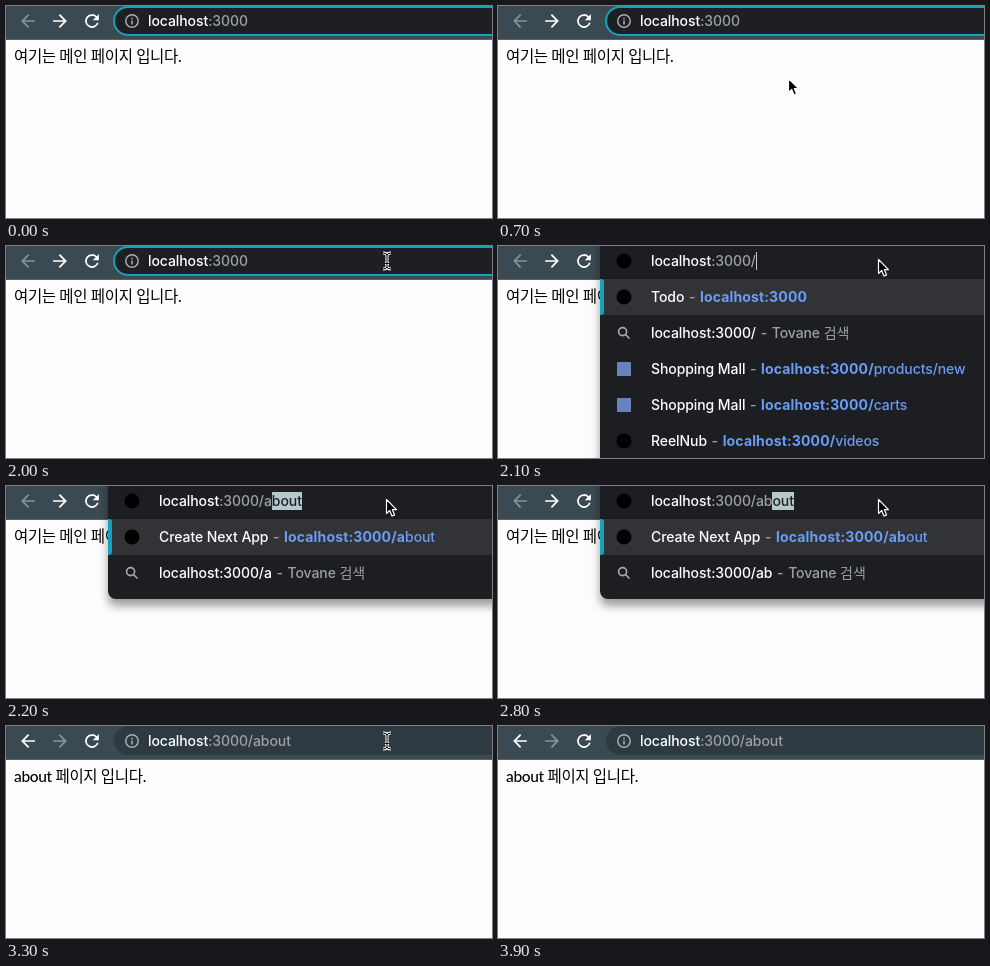
These frames come from a looping animation (486 by 212 pixels, 4900 ms). An HTML page:

```html
<!DOCTYPE html>
<html lang="ko">
<head>
<meta charset="utf-8">
<title>Page navigation</title>
<style>
  html, body { margin: 0; width: 100%; height: 100%; overflow: hidden; background: #fdfdfd; }
  #stage { position: relative; width: 486px; height: 212px; overflow: hidden; background: #fdfdfd; }
  #stage > * { position: absolute; box-sizing: border-box; }
  svg { left: 0; top: 0; }
  .toolbar { left: 0; top: 0; width: 486px; height: 34px; background: #3b4a52; border-bottom: 1px solid #566369; }
  .pill { left: 108px; top: 0; width: 420px; height: 29px; border-radius: 15px; background: #2e3a42; }
  .pill.focused { left: 107px; height: 30px; background: #1d1f22; border: 2px solid #14a3bd; }
  .dropdown { left: 102px; top: -20px; width: 420px; border-radius: 8px; background: #1d1e22;
              box-shadow: 0 7px 10px rgba(0, 0, 0, .38); }
  .active { left: 102px; top: 33px; width: 384px; height: 36px; background: #323336; }
  .marker { left: 102px; top: 33px; width: 4px; height: 36px; background: #14a3bd; border-radius: 0 3px 3px 0; }
  .line { white-space: pre; height: 18px; line-height: 18px; color: #fff;
          font: 500 14px/18px Inter, "Noto Sans CJK KR", "Noto Sans CJK", sans-serif; letter-spacing: -.08px; }
  .page { color: #000; letter-spacing: -.33px;
          font: 500 15.5px/18px Lato, "Noto Sans CJK KR", "Noto Sans CJK", sans-serif; }
  .dim { color: #9da1a6; }
  .dash { color: #9da1a6; word-spacing: 1px; }
  .url { color: #6b9cf5; }
  b { font-weight: 700; letter-spacing: .15px; }
  .selected { display: inline-block; height: 18px; background: #b5c9ca; color: #1d1f22; }
  .caret { display: inline-block; width: 1px; height: 18px; vertical-align: top; background: #c4c8cb; }
</style>
</head>
<body>
<div id="stage"></div>
<script>
const LOOP = 4900;
const stage = document.getElementById('stage');
const approach = [[57, 112], [150, 100], [290, 72], [408, 34], [400, 9], [381, 15]];

const box = (cls, style = '') => `<div class="${cls}" style="${style}"></div>`;
const line = (x, y, html, cls = '') =>
  `<div class="line ${cls}" style="left:${x}px;top:${y - 9}px">${html}</div>`;
const span = (cls, text) => `<span class="${cls}">${text}</span>`;
const svg = body => `<svg width="486" height="212">${body}</svg>`;
const at = (x, y, body, scale = 1) => `<g transform="translate(${x} ${y}) scale(${scale})">${body}</g>`;
const dot = (x, y) => `<circle cx="${x}" cy="${y}" r="7.5" fill="#000"/>`;

const back = color =>
  `<path fill="${color}" d="M8-1H-4.2L1.4-6.6 0-8-8 0 0 8 1.4 6.6-4.2 1H8z"/>`;
const reload = `<path fill="#fff" transform="translate(-12 -12)" d="M17.65 6.35A8 8 0 1 0 19.73 14h-2.08
  A6 6 0 1 1 16.22 7.78L13 11h7V4z"/>`;
const stop = '<path stroke="#e8eaed" stroke-width="1.8" d="M-5.5-5.5 5.5 5.5M5.5-5.5-5.5 5.5"/>';
const info = `<circle r="6.2" fill="none" stroke="#adb1b5" stroke-width="1.4"/>
  <path stroke="#adb1b5" stroke-width="1.5" d="M0-3.3v1.5M0-.6v4"/>`;
const search = '<path fill="none" stroke="#a9adb2" stroke-width="1.6" d="M1.3 1.3 5.5 5.5M2.6-1.4a4 4 0 1 1-8 0a4 4 0 1 1 8 0"/>';
const beamShape = 'M-4-8Q0-8 0-5.5Q0-8 4-8M0-5.5V5.5M-4 8Q0 8 0 5.5Q0 8 4 8M-2 2.5H2';
const beam = `<g fill="none"><path stroke="#fff" stroke-width="3" d="${beamShape}"/>
  <path stroke="#000" d="${beamShape}"/></g>`;
const arrow = `<path fill="#000" stroke="#fff" stroke-width="1.2" stroke-linejoin="round"
  d="M.5.5V14.5L3.7 11.5 6 17 8.6 15.9 6.3 10.6H10.5z"/>`;

function toolbar(t) {
  const arrived = t >= 3200, loading = t >= 3000 && t < 3300;
  const [backColor, forwardColor] = arrived ? ['#fff', '#87939a'] : ['#87939a', '#fff'];
  return box('toolbar') + svg(
    at(22, 15, back(backColor), .86) +
    at(54, 15, `<g transform="scale(-1 1)">${back(forwardColor)}</g>`, .86) +
    at(86, 15, loading ? stop : reload, loading ? 1 : .86));
}

function addressBar(t) {
  const host = 'localhost' + span('dim', t < 3000 ? ':3000' : ':3000/about');
  const caret = t >= 1100 && t < 1600 ? span('caret', '') : '';
  const content = t >= 1000 && t < 1100 ? span('selected', 'localhost:3000') : host + caret;
  return box(t < 3000 ? 'pill focused' : 'pill') + svg(at(126, 15, info)) + line(142, 15, content);
}

const dash = span('dash', ' - ');
const suggestion = (title, bold, rest = '') =>
  title + dash + span('url', `<b>${bold}</b>${rest}`);

function suggestions(t) {
  const typed = t < 2200 ? '' : t < 2300 ? 'a' : 'ab';
  const address = 'localhost:3000/';
  const rest = 'about'.slice(typed.length);
  const query = address + typed + dash + span('dim', 'Tovane 검색');
  const rows = typed
    ? [suggestion('Create Next App', address + typed, rest), query]
    : [suggestion('Todo', 'localhost:3000'), query,
       suggestion('Shopping Mall', address, 'products/new'),
       suggestion('Shopping Mall', address, 'carts'),
       suggestion('ReelNub', address, 'videos')];
  const rowY = i => 51 + 36 * i;
  const icons = rows.map((_, i) =>
    i === 1 ? at(126, rowY(i), search)
    : i === 2 || i === 3 ? `<rect x="119" y="${rowY(i) - 7}" width="14" height="14" fill="#6683bd"/>`
    : dot(126, rowY(i)));
  const ending = typed ? span('selected', rest) : span('caret', '');
  return box('dropdown', `height:${typed ? 133 : 260}px`) + box('active') + box('marker') +
    svg(dot(126, 15) + icons.join('')) +
    line(153, 15, 'localhost' + span('dim', ':3000/' + typed) + ending) +
    rows.map((row, i) => line(153, rowY(i), row)).join('');
}

function pointer(t) {
  if (t < 500 || t >= 3900) return '';
  if (t >= 2100 && t < 3000) return svg(at(380, 13, arrow));
  const [x, y] = t >= 3800 ? [199, 15] : approach[Math.min(5, Math.floor((t - 500) / 100))];
  return svg(at(x, y, y < 30 ? beam : arrow));
}

function scene(t) {
  const open = t >= 2100 && t < 3000;
  return toolbar(t) +
    line(8, 50, t < 3200 ? '여기는 메인 페이지 입니다.' : 'about 페이지 입니다.', 'page') +
    (open ? suggestions(t) : addressBar(t)) + pointer(t);
}

const start = performance.now();
let shown = '';
function frame() {
  const html = scene((performance.now() - start) % LOOP);
  if (html !== shown) stage.innerHTML = shown = html;
  requestAnimationFrame(frame);
}
frame();
</script>
</body>
</html>
```
